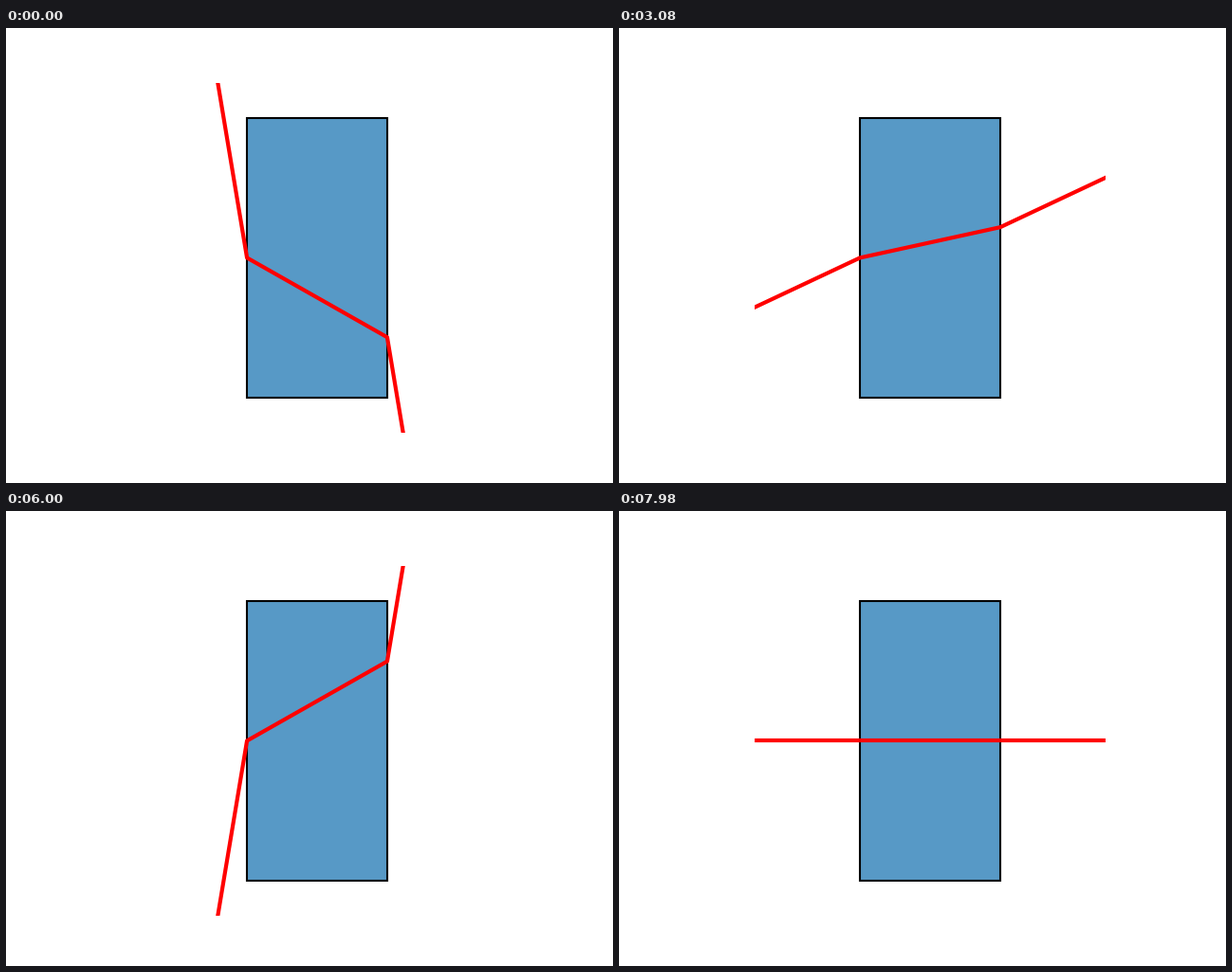
A matplotlib script for the animation above (8 s loop, 640 by 480 pixels).

```python
import numpy as np
import matplotlib.pyplot as plt
from matplotlib.animation import FuncAnimation
from matplotlib.colors import to_rgba
from matplotlib.patches import Rectangle

STEP = 20                    # ms per frame
LOOP = 8000                  # ms per loop
SWEEP, HOLD = 4000, 1000     # ms for one swing of the ray and for the rest after it
START = 980                  # ms at which the first swing begins
MAX_SLOPE = 6
INDEX = 2                    # refractive index of the slab
HALF_W, HALF_H = 2, 4
REACH = 10                   # length of the outer rays along x, past the axes

fig, ax = plt.subplots(figsize=(6.4, 4.8), dpi=100)
ax.set(xlim=(-5, 5), ylim=(-5, 5), aspect="equal")
ax.axis("off")
ax.add_patch(Rectangle((-HALF_W, -HALF_H), 2 * HALF_W, 2 * HALF_H,
                       facecolor=to_rgba("tab:blue", 0.75),
                       edgecolor="black", linewidth=1.5))
ray, = ax.plot([], [], color="red", linewidth=3)


def slope_at(ms):
    """Slope of the incoming ray: cosine swings with a rest at each end."""
    swing, t = divmod(ms - START, SWEEP + HOLD)
    sign = 1 if swing % 2 == 0 else -1
    return -sign * MAX_SLOPE * np.cos(np.pi * min(t / SWEEP, 1))


def trace(slope):
    """Corner points of the ray through the slab, by Snell's law."""
    inner = np.arcsin(np.sin(np.arctan(slope)) / INDEX)
    y_out = 2 * HALF_W * np.tan(inner)
    xs = [-HALF_W - REACH, -HALF_W, HALF_W, HALF_W + REACH]
    ys = [-REACH * slope, 0, y_out, y_out + REACH * slope]
    return xs, ys


def update(i):
    slope = slope_at(i * STEP)
    ray.set_data(*trace(0 if abs(slope) < 1e-9 else slope))
    return ray,


anim = FuncAnimation(fig, update, frames=LOOP // STEP, interval=STEP,
                     init_func=lambda: update(0), repeat=True, repeat_delay=0)
plt.show()
```
